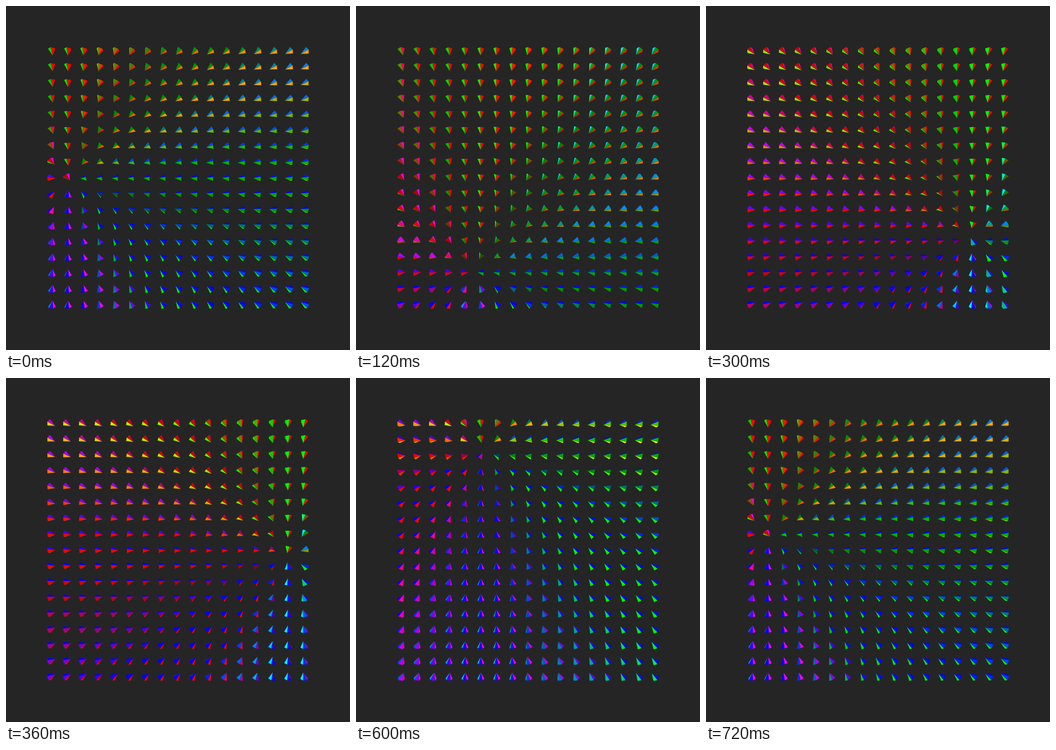
An HTML page with a canvas for the animation above (0.75 s loop, 500 by 500 pixels).

```html
<!DOCTYPE html>
<html>
<head>
<meta charset="utf-8">
<style>
html, body { margin: 0; width: 100%; height: 100%; overflow: hidden; background: #252525; }
canvas { display: block; }
</style>
</head>
<body>
<canvas id="stage" width="500" height="500"></canvas>
<script>
const ctx = document.getElementById('stage').getContext('2d');
const LOOP = 750, STEP = 30, RAD = Math.PI / 180;
const GRID = 17, GAP = 22.85, MID = 250;
const ORBIT = 158, EYE = 400;
const LENGTH = 9.6, RADIUS = 5.2, SIDES = 5;

// Stage-centred space: x right, y down, z towards the viewer.
const LIGHT_DIST = 800;
const LIGHTS = [[30, 2], [150, 1.4], [-90, 2.8]].map(([deg, gain]) => ({
  x: LIGHT_DIST * Math.cos(deg * RAD),
  y: LIGHT_DIST * Math.sin(deg * RAD),
  gain
}));

const dot = (a, b) => a[0] * b[0] + a[1] * b[1] + a[2] * b[2];

function shade(n, x, y) {
  const rgb = LIGHTS.map(l => {
    const dx = l.x - x, dy = l.y - y;
    const lit = l.gain * (n[0] * dx + n[1] * dy) / Math.hypot(dx, dy);
    return Math.round(255 * Math.min(1, Math.max(0, lit)));
  });
  return `rgb(${rgb})`;
}

function project([x, y, z]) {
  const k = EYE / (EYE - z);
  return [MID + x * k, MID + y * k];
}

// A five-sided cone, tipped over from facing the viewer to lie along (dx, dy).
function cone(x, y, dx, dy) {
  const tilt = (a, r, h) => {
    const u = Math.cos(a), v = Math.sin(a);
    const side = r * (v * dx - u * dy);
    return [h * dx - side * dy, h * dy + side * dx, -r * (u * dx + v * dy)];
  };
  const place = p => [x + p[0], y + p[1], p[2]];
  const turn = 2 * Math.PI / SIDES;
  const inner = RADIUS * Math.cos(turn / 2);
  const slant = Math.hypot(inner, LENGTH);
  const tip = place(tilt(0, 0, LENGTH / 2));
  for (let i = 0; i < SIDES; i++) {
    const a = -Math.PI / 2 + i * turn;
    const n = tilt(a + turn / 2, LENGTH / slant, inner / slant);
    if (dot(n, [-tip[0], -tip[1], EYE - tip[2]]) <= 0) continue;
    const corners = [a, a + turn].map(b => place(tilt(b, RADIUS, -LENGTH / 2)));
    ctx.beginPath();
    for (const p of [tip, ...corners]) ctx.lineTo(...project(p));
    ctx.closePath();
    ctx.fillStyle = shade(n, x, y);
    ctx.fill();
  }
}

function draw(now) {
  const step = Math.floor(now % LOOP / STEP);
  const angle = (1 + 14.66 * step) * RAD;
  const tx = -ORBIT * Math.cos(angle), ty = ORBIT * Math.sin(angle);
  ctx.fillStyle = '#252525';
  ctx.fillRect(0, 0, 500, 500);
  for (let row = 0; row < GRID; row++) {
    for (let col = 0; col < GRID; col++) {
      const x = (col - 8) * GAP, y = (row - 8) * GAP;
      const dist = Math.hypot(tx - x, ty - y) || 1;
      cone(x, y, (tx - x) / dist, (ty - y) / dist);
    }
  }
}

function tick() {
  draw(performance.now());
  requestAnimationFrame(tick);
}
tick();
</script>
</body>
</html>
```
